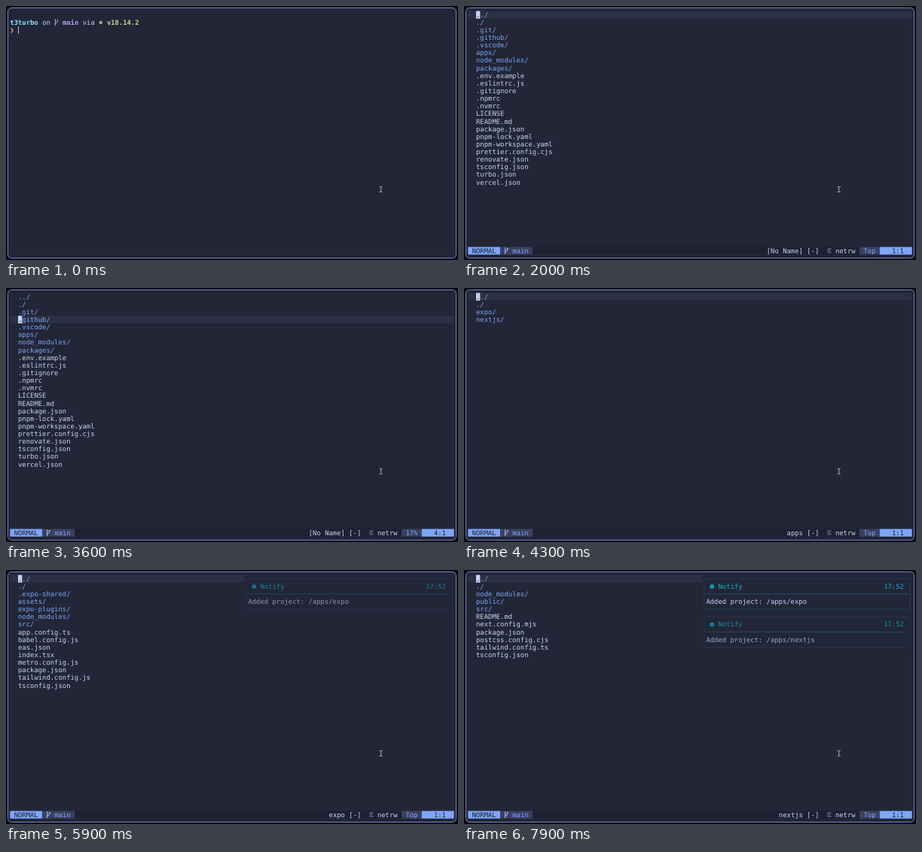
An HTML page that plays this animation: 600 px wide and 338 px high, repeating every 8 s.

```html
<!DOCTYPE html>
<html lang="en">
<head>
<meta charset="utf-8">
<title>Terminal session</title>
<style>
  html, body { margin: 0; width: 100%; height: 100%; overflow: hidden; background: #0c0d14; }
  svg { display: block; width: 600px; height: 338px; }
  text {
    font: 8.9px "DejaVu Sans Mono", "Noto Sans Mono", monospace;
    text-rendering: geometricPrecision;
    white-space: pre;
  }
  .bold { font-weight: bold; }
</style>
</head>
<body>
<svg viewBox="0 0 600 338" xmlns="http://www.w3.org/2000/svg">
  <rect x="2.5" y="2.5" width="595" height="333" rx="5" fill="#222637" stroke="#7686cc"/>
  <g id="screen"></g>
  <g id="notes"></g>
  <path d="M495.7 240.5h1.3l.7.6.7-.6h1.3M497.7 241v6M495.7 247.5h1.3l.7-.6.7.6h1.3"
        fill="none" stroke="#c3c7d2" stroke-width=".9"/>
</svg>
<script>
const LOOP = 8000;
const X0 = 5.3, Y0 = 6.6, CW = 5.358, RH = 10.13;
const C = {
  bg: '#222637', fg: '#c8d3f5', blue: '#7ea6f8', dark: '#1b1e2c', line: '#2b3042',
  gutter: '#3a4160', bar: '#1e2131', cyan: '#86e1fc', purple: '#bda2f7',
  green: '#c3dd80', teal: '#10b3cf', edge: '#24475a', rule: '#1d6478'
};

const DIRS = {
  root: {
    title: '[No Name]',
    files: `../ ./ .git/ .github/ .vscode/ apps/ node_modules/ packages/ .env.example
      .eslintrc.js .gitignore .npmrc .nvmrc LICENSE README.md package.json pnpm-lock.yaml
      pnpm-workspace.yaml prettier.config.cjs renovate.json tsconfig.json turbo.json vercel.json`
  },
  apps: { title: 'apps', files: '../ ./ expo/ nextjs/' },
  expo: {
    title: 'expo',
    files: `../ ./ .expo-shared/ assets/ expo-plugins/ node_modules/ src/ app.config.ts
      babel.config.js eas.json index.tsx metro.config.js package.json tailwind.config.js tsconfig.json`
  },
  nextjs: {
    title: 'nextjs',
    files: `../ ./ node_modules/ public/ src/ README.md next.config.mjs package.json
      postcss.config.cjs tailwind.config.ts tsconfig.json`
  }
};

// Each step: start time, then typed text or a directory with its cursor row
const STEPS = [
  [0, ''], [800, 'n'], [900, 'nv'], [1000, 'nvi'], [1100, 'nvim'], [1300, 'nvim '], [1600, 'nvim .'],
  [1800, 'root', 1], [3200, 'root', 2], [3300, 'root', 3], [3500, 'root', 4],
  [3700, 'root', 5], [3800, 'root', 6],
  [4100, 'apps', 1], [4600, 'apps', 2], [4800, 'apps', 3],
  [5200, 'expo', 1],
  [6300, 'apps', 1], [6600, 'apps', 2], [6700, 'apps', 3], [6800, 'apps', 4],
  [7100, 'nextjs', 1]
];
const NOTES = [
  { at: 5700, row: 0, path: '/apps/expo' },
  { at: 7600, row: 5, path: '/apps/nextjs' }
];

const px = col => X0 + col * CW;
const py = row => Y0 + row * RH;
const n2 = v => v.toFixed(2);

const text = (col, row, str, fill, cls = '') =>
  `<text x="${n2(px(col))}" y="${n2(py(row) + 8.1)}" fill="${fill}" class="${cls}">${str}</text>`;
const cells = (col, row, cols, fill) =>
  `<rect x="${n2(px(col))}" y="${n2(py(row))}" width="${n2(cols * CW)}" height="${RH}" fill="${fill}"/>`;
const branch = (col, row, fill) =>
  `<path transform="translate(${n2(px(col))} ${n2(py(row))})" fill="none" stroke="${fill}" stroke-width="1"
    d="M1.2 .6v9M4.2 1.6v2.2q0 1.6-3 2.8M3.2 2.6h2"/>`;

function prompt(typed) {
  return text(0, 1, 't3turbo', C.cyan, 'bold') + text(8, 1, 'on', C.fg) +
    branch(11, 1, C.purple) + text(13, 1, 'main', C.purple, 'bold') + text(18, 1, 'via', C.fg) +
    `<circle cx="${px(22.5)}" cy="${py(1.52)}" r="2.3" fill="#93b56c"/>` +
    text(24, 1, 'v18.14.2', C.green, 'bold') +
    text(0, 2, '❯', '#d0cb68', 'bold') + text(2, 2, typed, C.fg) +
    `<rect x="${n2(px(2 + typed.length))}" y="27" width="1" height="10" fill="#b4bad0"/>`;
}

function statusBar(title, row, count) {
  const name = title + ' [-]';
  const place = row === 1 ? 'Top' : row === count ? 'Bot'
    : (Math.floor(row / count * 100) + '%').padStart(3);
  const y = py(31);
  return cells(0, 31, 110, C.bar) +
    cells(0, 31, 8, C.blue) + text(1, 31, 'NORMAL', C.dark) +
    cells(8, 31, 8, C.gutter) + branch(9, 31, '#b5c8f8') + text(11, 31, 'main', C.blue) +
    text(87 - name.length, 31, name, C.fg) +
    `<path d="M482.3 ${y + 2.6}h5.4M482.3 ${y + 4.9}h4M482.3 ${y + 7.2}h5.4" stroke="#8d94ad" stroke-width=".9"/>` +
    text(91, 31, 'netrw', C.fg) +
    cells(97, 31, 5, C.gutter) + text(98, 31, place, C.blue) +
    cells(102, 31, 8, C.blue) + text(105, 31, row + ':1', C.dark);
}

function listing(dir, row) {
  const { title } = DIRS[dir];
  const files = DIRS[dir].files.split(/\s+/);
  return cells(0, row - 1, 110, C.line) +
    files.map((f, i) => text(2, i, f, f.endsWith('/') ? C.blue : C.fg)).join('') +
    cells(2, row - 1, 1, C.fg) + text(2, row - 1, files[row - 1][0], C.dark) +
    statusBar(title, row, files.length);
}

function note({ row, path }) {
  const left = px(58.5), top = py(row + .5), mid = py(row + 2.5);
  return `<g><rect x="${px(58)}" y="${py(row)}" width="${52 * CW}" height="${5 * RH}" fill="${C.bg}"/>
    <g class="ink">
      <rect x="${left}" y="${top}" width="${51 * CW}" height="${4 * RH}" rx="2" fill="none" stroke="${C.edge}" stroke-width=".8"/>
      <path d="M${px(59)} ${mid}H${px(109)}" stroke="${C.rule}" stroke-width=".8"/>
      <circle cx="${px(60.45)}" cy="${py(row + 1.52)}" r="2.8" fill="${C.teal}"/>
      <path d="M${px(60.45)} ${py(row + 1.34)}v.8m0 .6v2" stroke="${C.bg}" stroke-width=".9"/>
      ${text(62, row + 1, 'Notify', C.teal)}${text(103, row + 1, '17:52', C.teal)}
      ${text(59, row + 3, 'Added project: ' + path, C.fg)}
    </g></g>`;
}

const screen = document.getElementById('screen');
const notes = document.getElementById('notes');
notes.innerHTML = NOTES.map(note).join('');
let shown = null;

function draw(t) {
  const step = STEPS.findLast(s => s[0] <= t);
  if (step !== shown) {
    const [, what, row] = shown = step;
    screen.innerHTML = row ? listing(what, row) : prompt(what);
  }
  NOTES.forEach((n, i) => {
    const box = notes.children[i], age = t - n.at;
    box.style.display = age < 0 ? 'none' : '';
    box.querySelector('.ink').style.opacity = age < 0 ? 0 : 1 - Math.exp(-(age + 100) / 300);
  });
}

const start = performance.now();
function tick() {
  draw((performance.now() - start) % LOOP);
  requestAnimationFrame(tick);
}
tick();
</script>
</body>
</html>
```
